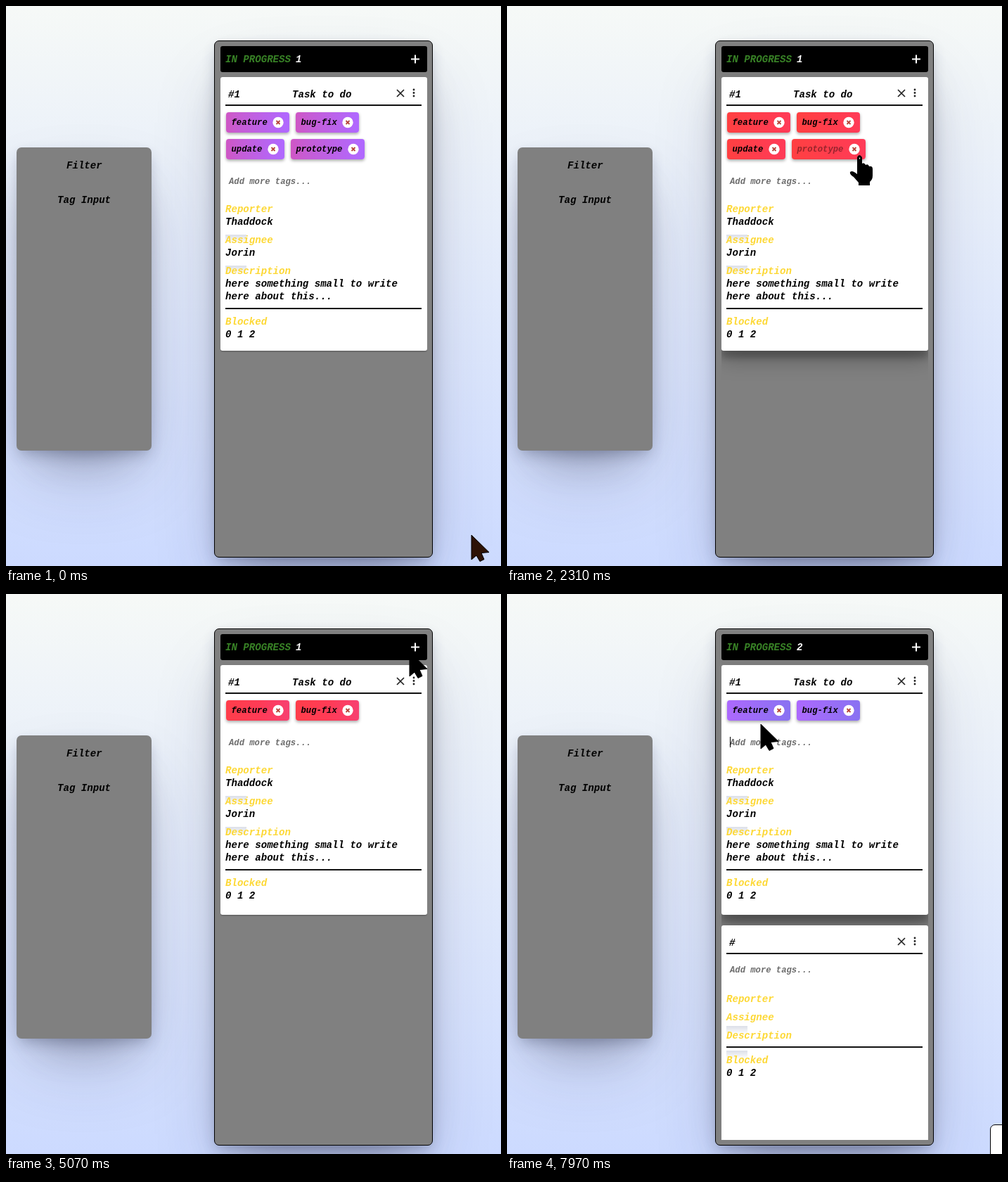
Animation, 704 px wide and 796 px high, one loop 8 s. Source, as an HTML page:

```html
<!DOCTYPE html>
<html lang="en">
<head>
<meta charset="utf-8">
<title>Task board</title>
<style>
html, body { margin: 0; width: 100%; height: 100%; overflow: hidden; }
body {
  position: relative;
  background: linear-gradient(#f6f9f7, #ccdaff 796px);
  font: italic bold 14.08px/18px "Liberation Mono", monospace;
  color: #000;
}
div, span, svg { position: absolute; box-sizing: border-box; white-space: pre; }
svg { overflow: visible; left: 0; top: 0; width: 1px; height: 1px; }
.panel {
  background: #808080; border-radius: 7px;
  box-shadow: 0 50px 100px -20px rgba(50,50,93,.25), 0 30px 60px -30px rgba(0,0,0,.3),
    0 8px 20px -4px rgba(40,50,90,.3);
}
.column { border: 1px solid #000; }
.header { background: #000; border-radius: 3px; }
.list { overflow: hidden; }
.card { background: #fff; border-radius: 3px; }
.rule { background: #111; height: 2px; width: 279px; left: 7px; }
.label { color: #fdd835; }
.hint { color: #6c6c6c; font-size: 12.2px; }
.band { left: 7px; width: 30px; height: 12px; background: linear-gradient(#dcdfe8, #fff0); }
.tag {
  height: 29px; border-radius: 4px; font-size: 12.2px;
  background: linear-gradient(90deg, #ff4040, #ff3b56 16.7%, #ee4490 34%, #c65cd4 49%,
    #b068ff 62%, #8b71f2 79%, #6a70f0) 0 0 / 600% 100%;
  box-shadow: 0 2px 4px rgba(0,0,0,.35);
}
.corner { left: 687px; top: 754px; width: 60px; height: 60px; background: #fff; border: 1px solid #000; border-radius: 7px; }
.caret { left: 12px; top: 102px; width: 1px; height: 15px; background: #000; }
</style>
</head>
<body>
<script>
const BASELINE = 13;

function box(parent, cls, x, y, w, h) {
  const el = document.createElement('div');
  el.className = cls;
  const place = { left: x, top: y, width: w, height: h };
  for (const key in place) if (place[key] != null) el.style[key] = place[key] + 'px';
  parent.append(el);
  return el;
}

function text(parent, x, baseline, content, cls = '') {
  const el = document.createElement('span');
  el.className = cls;
  el.textContent = content;
  el.style.left = x + 'px';
  el.style.top = baseline - BASELINE + 'px';
  parent.append(el);
  return el;
}

function drawing(parent, markup) {
  parent.insertAdjacentHTML('beforeend', `<svg>${markup}</svg>`);
  return parent.lastElementChild;
}

// Left panel and column
const filter = box(document.body, 'panel', 15, 201, 192, 431);
text(filter, 71, 30, 'Filter');
text(filter, 58, 79, 'Tag Input');
box(document.body, 'panel column', 296, 49, 311, 735);
const header = box(document.body, 'header', 305, 57, 294, 37);
text(header, 7, 23, 'IN PROGRESS').style.color = '#388226';
const count = text(header, 107, 23, '1');
count.style.color = '#fff';
drawing(header, '<path d="M271 18.5h12M277 12.5v12" stroke="#fff" stroke-width="2"/>');
const list = box(document.body, 'list', 305, 94, 294, 682);

// Cards
function makeCard(top, height, id, title) {
  const card = box(list, 'card', 0, top, 294, height);
  text(card, 11, 29, id);
  text(card, 102, 29, title);
  box(card, 'rule', null, 39);
  drawing(card, `<path d="M251 18l10 10m0-10l-10 10" stroke="#222" stroke-width="1.7"/>
    <g fill="#222"><circle cx="275" cy="18" r="1.4"/><circle cx="275" cy="22.5" r="1.4"/><circle cx="275" cy="27" r="1.4"/></g>`);
  return card;
}

// rows: [baseline, content, class]
function fill(parent, rows, bands, ruleY) {
  bands.forEach(y => box(parent, 'band', null, y));
  box(parent, 'rule', null, ruleY);
  rows.forEach(([y, content, cls]) => text(parent, cls === 'hint' ? 12 : 7, y, content, cls));
}

const card = makeCard(7, 389, '#1', 'Task to do');
const details = box(card, '', 0, 0, 294, 0);
fill(details, [
  [153, 'Add more tags...', 'hint'],
  [192, 'Reporter', 'label'], [210, 'Thaddock'],
  [236, 'Assignee', 'label'], [254, 'Jorin'],
  [280, 'Description', 'label'],
  [298, 'here something small to write'], [316, 'here about this...'],
  [352, 'Blocked', 'label'], [370, '0 1 2']
], [224, 268], 328);

const newCard = makeCard(377, 330, '#', '');
fill(newCard, [
  [68, 'Add more tags...', 'hint'],
  [109, 'Reporter', 'label'], [135, 'Assignee', 'label'], [161, 'Description', 'label'],
  [196, 'Blocked', 'label'], [214, '0 1 2']
], [143, 178], 172);

function makeTag(x, y, name, width) {
  const el = box(card, 'tag', x, y, width);
  const label = text(el, 7.5, 19, name);
  const cx = width - 16;
  drawing(el, `<circle cx="${cx}" cy="14.5" r="7.7" fill="#fff"/>
    <path d="M${cx - 2.5} 12l5 5m0-5l-5 5" stroke="#b8443a" stroke-width="1.8"/>`);
  return { el, label };
}
const feature = makeTag(8, 50, 'feature', 90);
const bugfix = makeTag(107, 50, 'bug-fix', 90);
const update = makeTag(8, 88, 'update', 83);
const prototype = makeTag(100, 88, 'prototype', 105);
const tags = [feature, bugfix, update, prototype];

const caret = box(card, 'caret');
const corner = box(document.body, 'corner');

const arrow = drawing(document.body, '<path d="M0 0V35L7 29L12 37.5L18 34.5L14 25.5L25 24.5Z" stroke="#000"/>');
const hand = drawing(document.body, `<path d="M-2 2Q1 -4 5 2V11Q8 9 10 13Q14 11 15 15Q20 14 20 19V28Q20 34 16 37V42H0V38
  L-7 30Q-13 26 -12 23Q-9 20 -2 26Z"/><path d="M1.5 2.5v2" stroke="#fff" stroke-width="1.3"/>`);

// Timeline
const LOOP = 8000;
const REMOVE_PROTOTYPE = 2680, REMOVE_UPDATE = 4270, ADD_CARD = 5350, FOCUS = 7450;
const path = [
  [0, 662, 752], [40, 662, 752], [350, 575, 110], [620, 443, 93], [910, 489, 95], [1300, 500, 160],
  [1900, 490, 204], [2310, 500, 213], [2720, 500, 213], [3500, 388, 206], [3840, 377, 205],
  [4320, 377, 205], [4880, 572, 92], [5070, 574, 82], [5450, 574, 82], [6000, 520, 250],
  [6590, 397, 508], [7200, 366, 215], [7470, 363, 196], [7970, 361, 185], [8000, 361, 185]
];
const hovers = [
  [0, 0], [250, 0], [450, 1], [600, 1], [900, .03], [1050, 0], [1350, 1],
  [4780, 1], [5040, 0], [6750, 0], [7050, 1], [8000, 1]
];

const clamp = v => Math.min(1, Math.max(0, v));
const between = (t, a, b) => t >= a && t < b;
const show = (el, on) => { el.style.display = on ? '' : 'none'; };

function sample(keys, t) {
  const i = Math.max(1, keys.findIndex(k => k[0] > t));
  const a = keys[i - 1], b = keys[i];
  const u = clamp((t - a[0]) / (b[0] - a[0]));
  const s = u * u * (3 - 2 * u);
  return a.slice(1).map((v, j) => v + (b[j + 1] - v) * s);
}

// cubic-bezier(.25, .1, .25, 1)
function ease(x) {
  x = clamp(x);
  let lo = 0, hi = 1;
  for (let i = 0; i < 18; i++) {
    const m = (lo + hi) / 2;
    if (.75 * m * (1 - m) + m ** 3 < x) lo = m; else hi = m;
  }
  return .3 * lo * (1 - lo) ** 2 + 3 * lo * lo * (1 - lo) + lo ** 3;
}

// The tag gradient restarts whenever a tag is removed.
function gradientShift(t) {
  if (t < REMOVE_PROTOTYPE) return 1 - ease(.27 + t / 4000);
  return ease((t - (t < REMOVE_UPDATE ? REMOVE_PROTOTYPE : REMOVE_UPDATE)) / 8000);
}

function render(t) {
  const added = t >= ADD_CARD, collapsed = t >= REMOVE_UPDATE;
  show(newCard, added);
  show(corner, added);
  count.textContent = added ? '2' : '1';

  const shift = gradientShift(t) * 100;
  tags.forEach(tag => { tag.el.style.backgroundPosition = shift + '% 0'; });
  show(prototype.el, t < REMOVE_PROTOTYPE);
  show(update.el, !collapsed);
  prototype.label.style.opacity = 1 - .6 * clamp((t - 2130) / 150);
  update.label.style.opacity = 1 - .6 * clamp((t - 4000) / 150);
  details.style.top = collapsed ? '-38px' : '0';
  card.style.height = (collapsed ? 355 : 389) + 'px';
  show(caret, t >= FOCUS);

  const [h] = sample(hovers, t);
  const mix = (a, b) => a + (b - a) * h;
  card.style.boxShadow =
    `0 ${mix(1, 14)}px ${mix(3, 28)}px rgba(0,0,0,${mix(.12, .25)}),` +
    `0 ${mix(1, 10)}px ${mix(2, 10)}px rgba(0,0,0,${mix(.24, .22)})`;

  const [x, y] = sample(path, t);
  const pointing = between(t, 2050, 2760) || between(t, 3650, 4330);
  show(hand, pointing);
  show(arrow, !pointing);
  arrow.style.fill = t < 40 ? '#2d1206' : '#000';
  arrow.style.transform = hand.style.transform = `translate(${x}px, ${y}px)`;
}

const start = performance.now();
function tick() {
  render((performance.now() - start) % LOOP);
  requestAnimationFrame(tick);
}
tick();
</script>
</body>
</html>
```
